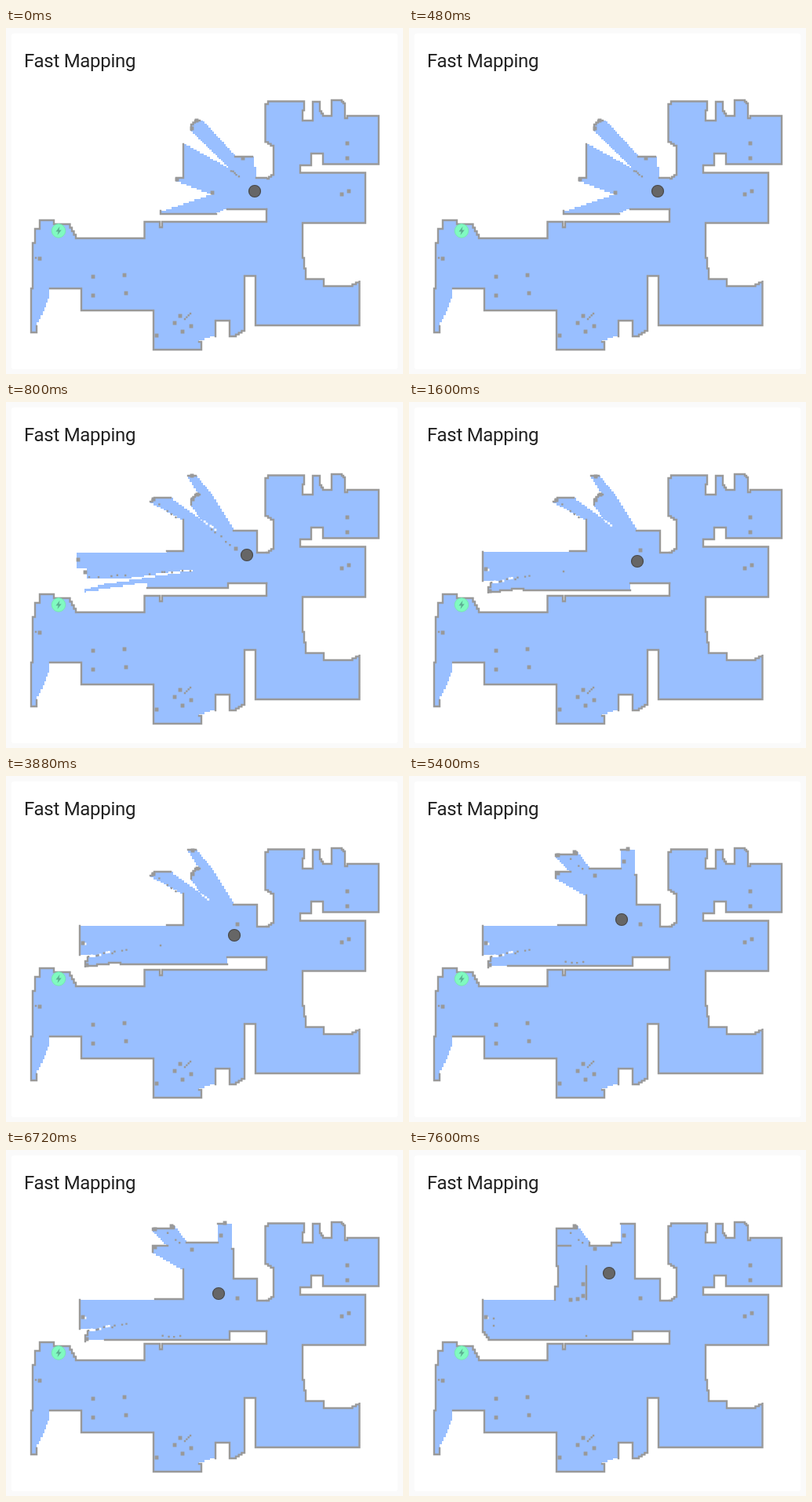
An HTML page for the animation above (8000 ms loop, 506 by 441 pixels).

```html
<!DOCTYPE html>
<html lang="en">
<head>
<meta charset="utf-8">
<title>Fast Mapping</title>
<style>
  html, body { margin: 0; width: 100%; height: 100%; overflow: hidden; background: #fafafa; }
  svg { display: block; width: 506px; height: 441px; }
  .title { font: 24px Roboto, sans-serif; letter-spacing: -0.012em; fill: #212121; }
  .floor { fill: #99bfff; shape-rendering: crispEdges; }
  .wall, .dot, .speck, .hole { fill: none; stroke: #999; stroke-linecap: square; }
  .wall { stroke-width: 2.4; }
  .dot { stroke-width: 4.8; }
  .speck { stroke-width: 2.4; }
  .hole { stroke: #fff; stroke-width: 2.8; }
  .robot { fill: #666; stroke: #484848; stroke-width: 1.2; }
  .scan { visibility: hidden; animation: 8s step-end infinite; }
</style>
</head>
<body>
<svg viewBox="0 0 506 441">
  <rect x="7" y="7" width="492" height="428" rx="3" fill="#fff"/>
  <text class="title" x="23" y="50">Fast Mapping</text>
  <g id="house"></g>
  <g id="scans"></g>
  <circle cx="67" cy="258.5" r="8.8" fill="#80fac0" stroke="#78e6b2"/>
  <path d="M68.5 253L63.5 259.5H66.6L65.5 264L70.7 257.4H67.5Z" fill="#5cae91"/>
</svg>
<style id="timing"></style>
<script>
const CELL = 2.35;
const LOOP = 8000;

// Slanted runs become stairs. A later M is an open edge: floor without wall.
function trace(route) {
  let x, y, floor = '', wall = '';
  for (const [, cmd, args] of route.matchAll(/([MLHV])([^MLHV]*)/g)) {
    const n = args.trim().split(' ').map(Number);
    const [tx, ty] = cmd === 'H' ? [n[0], y] : cmd === 'V' ? [x, n[0]] : n;
    const move = `M${tx} ${ty}`;
    if (!floor) {
      floor = wall = move;
    } else {
      const dx = tx - x, dy = ty - y;
      const steps = Math.max(1, Math.round(Math.min(Math.abs(dx), Math.abs(dy)) / CELL));
      const run = `h${dx / steps}v${dy / steps}`.repeat(steps);
      floor += run;
      wall += cmd === 'M' ? move : run;
    }
    [x, y] = [tx, ty];
  }
  return { floor, wall };
}

function seeded(seed) {
  return () => (seed = seed * 16807 % 2147483647) / 2147483647;
}

// Loose cells strewn along a line, as a grazing laser beam leaves them.
function scatter(x1, y1, x2, y2, count) {
  const random = seeded(x1 * y2);
  return Array.from({ length: count }, (_, i) => {
    const t = (i + random()) / count;
    return [x1 + (x2 - x1) * t, y1 + (y2 - y1) * t + (random() - 0.5) * CELL];
  });
}

const path = (name, d) => `<path class="${name}" d="${d}"/>`;
const marks = (name, points) => path(name, points.map(p => `M${p}h.01`).join(''));

function draw({ route, dots = '', specks = [], holes = [], inner = '' }) {
  const { floor, wall } = trace(route);
  return path('floor', floor) + marks('hole', holes) + path('wall', wall + inner) +
    marks('dot', dots.split(' ').filter(Boolean)) + marks('speck', specks);
}

const house = {
  route: 'M332 192L341 185V150L330.5 143V97L334 93.5H380V105L378 118H391V94H400V106L404 112H412L415 106' +
    'V92H426L432 98V115H435V112H475V173.5H404V160H389V175H375V184.5H458V248.5H378V293L382 320H405V329H437L450.5 322' +
    'V379H318V316H304V386L293 393H285V373H267V393M246 400L249 410H188V360H96V332H56M55 345M49 361M39 380' +
    'V388H32V332H34V274H37V256H43V245H61V250H79L89 268H176.5V247H196V254H199V247H332V231',
  dots: '435,147 435,166 428,212 437,208 111,317 151,315 111,341 153,338 222,367 215,376 225,387 236,380 192,392 43,294',
  specks: [[38, 293], ...[0, 1, 2, 3].map(i => [228 + i * CELL, 371 - i * CELL])]
};

// Stretches of outline that several scans have in common.
const porch = 'H320V192H332';
const northRay = `M213 126M252 153M236 131V124L241 118H247M232 94H242M263 120M290 164${porch}`;
const westSpur = 'H226V150M184 127L189 122H210';
const westEnd = 'H104V231M114 231M114 228M94 228V191';
const westDots = '295,189 98,213 103,241';
const westNoise = {
  specks: scatter(104, 231, 155, 221, 8),
  holes: [[101, 214], ...scatter(108, 230, 138, 224, 4)]
};

const scans = [
  {
    lasts: 800,
    robot: [317, 208],
    route: 'M332 231H282M268 237H197V233M262 211M217 194V191H226V148M290 183' +
      'M236 130V123L241 118H247M251 119M292 164H314M319 191H332',
    dots: '263,210 302,166 237,128 243,118 218,193',
    specks: scatter(286, 181, 297, 190, 5)
  },
  {
    lasts: 800,
    robot: [307, 195],
    route: 'M332 231H283V237H180M180 231M102 243M100 238M125 231M238 214M160 225M103 225M103 212M90 212M90 192M205 190' +
      westSpur + northRay,
    dots: '92,201 101,217 293,187 237,94 238,124 244,118 188,124',
    specks: [...scatter(104, 223, 160, 220, 5), ...scatter(180, 219, 240, 214, 6),
      ...scatter(194, 129, 218, 148, 4), ...scatter(260, 160, 288, 184, 5)],
    holes: scatter(252, 152, 270, 165, 5)
  },
  {
    lasts: 3800,
    robot: [291, 203],
    route: `M332 231H282M282 240H146M146 238L101 244V236${westEnd}M205 190${westSpur}${northRay}`,
    dots: `${westDots} 238,95 238,125 244,118 188,125`,
    specks: [...westNoise.specks, [197, 216], ...scatter(194, 129, 218, 148, 4)],
    holes: [...westNoise.holes, ...scatter(250, 151, 260, 158, 3)]
  },
  {
    lasts: 2200,
    robot: [271, 183],
    route: `M332 231H285V242H126M101 244V236${westEnd}M190 190H226V152M187 130V122H206M187 102V100L214 97` +
      `M230 118L270 118M270 94H280M288 93M288 126H290V164${porch}`,
    dots: `${westDots} 237,127 274,109 279,93 190,124 190,101 211,97`,
    specks: [...westNoise.specks, ...scatter(197, 237, 226, 237, 4), ...scatter(205, 104, 222, 119, 3)],
    holes: westNoise.holes
  },
  {
    lasts: 400,
    robot: [255, 157],
    route: `M332 231H285V242H104L94 229V191M186 191V174H190V148H188V100L214 97M230 118V122H258V118H270M270 94H288V164${porch}`,
    dots: '237,126 274,109 295,189 206,191 215,190 222,171 222,186 98,213 211,97',
    specks: [...scatter(108, 214, 108, 233, 2), [226, 237], ...scatter(205, 104, 222, 119, 3)],
    holes: [[100, 214]],
    inner: 'M190 122H206M226 148V190'
  }
];

let start = 0;
const percent = ms => `${ms / LOOP * 100}%`;
const rules = scans.map(({ lasts }, i) => {
  const from = percent(start), to = percent(start += lasts);
  return `@keyframes scan${i} { 0% { visibility: hidden } ${from} { visibility: visible } ${to} { visibility: hidden } }`;
});

document.getElementById('timing').textContent = rules.join('\n');
document.getElementById('house').innerHTML = draw(house);
document.getElementById('scans').innerHTML = scans.map((scan, i) => {
  const [x, y] = scan.robot;
  return `<g class="scan" style="animation-name: scan${i}">${draw(scan)}<circle class="robot" cx="${x}" cy="${y}" r="7.5"/></g>`;
}).join('');
</script>
</body>
</html>
```
